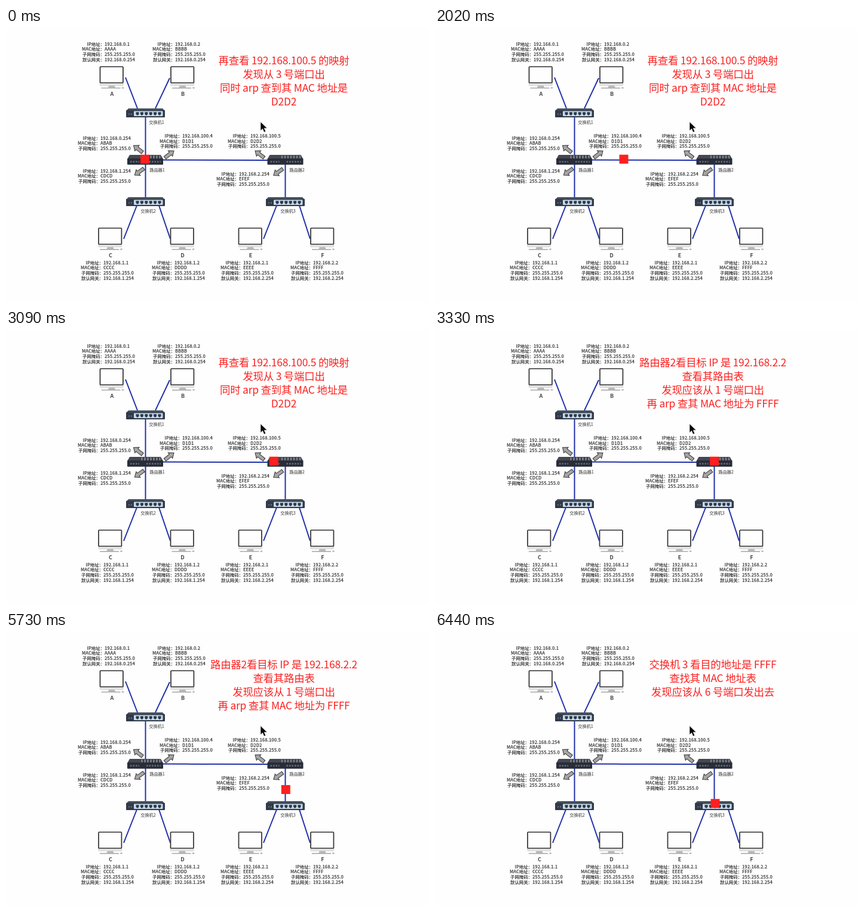
An HTML page that plays this animation: 708 px wide and 460 px high, repeating every 8 s.

```html
<!DOCTYPE html>
<html lang="zh-CN">
<head>
<meta charset="utf-8">
<style>
html, body { margin: 0; width: 100%; height: 100%; overflow: hidden; background: #fefefe; }
svg { display: block; }
text { font-family: "Noto Sans CJK SC", "Noto Sans CJK JP", "Noto Sans CJK", sans-serif; }
.info { font-size: 7.4px; font-weight: 700; fill: #444; }
.device { font-size: 7.2px; font-weight: 500; fill: #333; text-anchor: middle; }
.host { font-size: 9px; font-weight: 700; fill: #444; text-anchor: middle; }
.note { font-size: 17.4px; letter-spacing: -.2px; fill: #fd2020; text-anchor: middle; }
.end { text-anchor: end; }
.link { stroke: #2030aa; stroke-width: 2; fill: none; }
</style>
</head>
<body>
<svg width="708" height="460" viewBox="0 0 708 460">
  <defs>
    <g id="pc">
      <path d="M16 32h9l1.5 4h-12z" fill="#b9b9b9"/>
      <rect x=".7" y=".7" width="39" height="32" rx="1.5" fill="#e4e4e4" stroke="#c4c4c4" stroke-width=".6"/>
      <rect x="1" y="1" width="38.4" height="27" rx="1" fill="#fefefe" stroke="#333" stroke-width="1.7"/>
      <path d="M3 36.8h32" stroke="#aaa" stroke-width="1.6"/>
      <ellipse cx="39" cy="36.5" rx="2" ry="1.2" fill="#b5b5b5"/>
    </g>
    <g id="switch">
      <path d="M4 0h57l4 4H0z" fill="#46515f"/>
      <rect y="3" width="65" height="12" rx="1" fill="#303b4a"/>
      <rect x="13" y="4.5" width="48.5" height="8.5" rx="1" fill="#cbd9e6"/>
      <circle cx="5" cy="9.5" r="1" fill="#a9727c"/>
      <circle cx="9" cy="9.5" r="1" fill="#8293a8"/>
    </g>
    <g id="router">
      <path d="M4 0h52l4 7H0z" fill="#454852"/>
      <rect y="6" width="60" height="10.5" rx="1" fill="#292d38"/>
      <path d="M24 3.5h31" stroke="#b8bcc4" stroke-width="5" stroke-dasharray="1 4"/>
      <path d="M5 11.5h15M32 11.5h24" stroke="#68707e" stroke-width="2.4" stroke-dasharray="2.5 2"/>
    </g>
    <path id="arrow" d="M-9.5 0L-2-6v3.2H9.5v5.6H-2V6z" fill="#a6a6a6" stroke="#333" stroke-width="1"/>
  </defs>
  <g id="scene"></g>
  <g id="notes"></g>
  <rect id="packet" width="15" height="15" fill="#ff1f1f"/>
  <path d="M426 157.500v15l3.500-3.300 2.500 5.800 2.700-1.200-2.500-5.600h4.800z" fill="#080808" stroke="#fff" stroke-width=".6"/>
</svg>
<script>
const $ = id => document.getElementById(id);
const label = (cls, x, y, s) => `<text class="${cls}" x="${x}" y="${y}">${s}</text>`;
const use = (id, x, y, turn = 0) =>
  `<use href="#${id}" transform="translate(${x} ${y}) rotate(${turn})"/>`;

const fields = ['IP地址：', 'MAC地址：', '子网掩码：', '默认网关：'];
function info(x, y, ip, mac, gateway) {
  return [ip, mac, '255.255.255.0', gateway].filter(Boolean).map((value, i) =>
    label('info end', x, y + i * 8.7, fields[i]) + label('info', x, y + i * 8.7, value)).join('');
}

function host(name, x, y, ip, textX, textY) {
  const net = '192.168.' + ip.split('.')[0];
  return use('pc', x, y) + label('host', x + 21, y + 50.3, name) +
    info(textX, textY, '192.168.' + ip, name.repeat(4), net + '.254');
}

function switchBox(n, x, y, nameX, nameY) {
  let ports = '';
  for (let i = 0; i < 6; i++) {
    ports += `<path d="M${x + 16.5 + i * 7.4} ${y + 6.3}h5v3l-1.500 2.200h-2l-1.500-2.200z" fill="#29394c"/>`;
  }
  return use('switch', x, y) + ports + label('device', nameX, nameY, '交换机' + n);
}

const links = 'M200 83L220 135M274 84L250 135M233.500 150V214M263 221.500L438 222' +
  'M233.500 229V286M467.500 229V286M219 298L197 354M256 298L275 354M453 298L431 354M491 298L509 354';

$('scene').innerHTML = [
  `<path class="link" d="${links}"/>`,
  host('A', 156.500, 64, '0.1', 165, 29.700),
  host('B', 275, 64, '0.2', 283, 29.700),
  host('C', 154, 335, '1.1', 163, 396.700),
  host('D', 274.500, 335, '1.2', 282, 396.700),
  host('E', 388.500, 335, '2.1', 397, 396.700),
  host('F', 509, 335, '2.2', 514, 396.700),
  switchBox(1, 201, 135, 252, 160.700),
  switchBox(2, 201, 284, 238, 309.700),
  switchBox(3, 435, 284, 472, 309.700),
  use('router', 203, 213), label('device', 253, 241, '路由器1'),
  use('router', 437.500, 213), label('device', 487, 241, '路由器2'),
  info(158, 187.700, '192.168.0.254', 'ABAB'),
  info(295, 183.900, '192.168.100.4', 'D1D1'),
  info(409, 183.900, '192.168.100.5', 'D2D2'),
  info(158, 242.600, '192.168.1.254', 'CDCD'),
  info(390, 247.700, '192.168.2.254', 'EFEF'),
  use('arrow', 221, 203, 38), use('arrow', 273.500, 212, 142), use('arrow', 223, 241.500, -36),
  use('arrow', 424.500, 212, 38), use('arrow', 455.500, 242, -36)
].join('');

const notes = [
  ['再查看 192.168.100.5 的映射', '发现从 3 号端口出', '同时 arp 查到其 MAC 地址是', 'D2D2'],
  ['路由器2看目标 IP 是 192.168.2.2', '查看其路由表', '发现应该从 1 号端口出', '再 arp 查其 MAC 地址为 FFFF'],
  ['交换机 3 看目的地址是 FFFF', '查找其 MAC 地址表', '发现应该从 6 号端口发出去']
];
$('notes').innerHTML = notes.map(lines => '<g>' +
  lines.map((s, i) => label('note', 465, 60.6 + i * 23.2, s)).join('') + '</g>').join('');

// The packet advances in discrete ticks; the small bias absorbs rounding.
const ticks = (t, start) => Math.floor((t - start + 5) / 118.33);

function packetAt(t) {
  if (t < 1430) return [232.5, 220.2];
  if (t < 5130) return [Math.min(467.5, 242.5 + 14.7 * ticks(t, 1430)), 220.2];
  const n = ticks(t, 5130);
  return [Math.min(469, 467.5 + n * .15), n < 8 ? 230 + n * 6.9 : 287.8];
}

function draw(t) {
  const [x, y] = packetAt(t);
  $('packet').setAttribute('x', x - 7.5);
  $('packet').setAttribute('y', y - 7.5);
  const current = t < 3330 ? 0 : t < 6440 ? 1 : 2;
  [...$('notes').children].forEach((g, i) => g.style.display = i === current ? '' : 'none');
}

const start = performance.now();
function frame() {
  draw((performance.now() - start) % 8000);
  requestAnimationFrame(frame);
}
frame();
</script>
</body>
</html>
```
